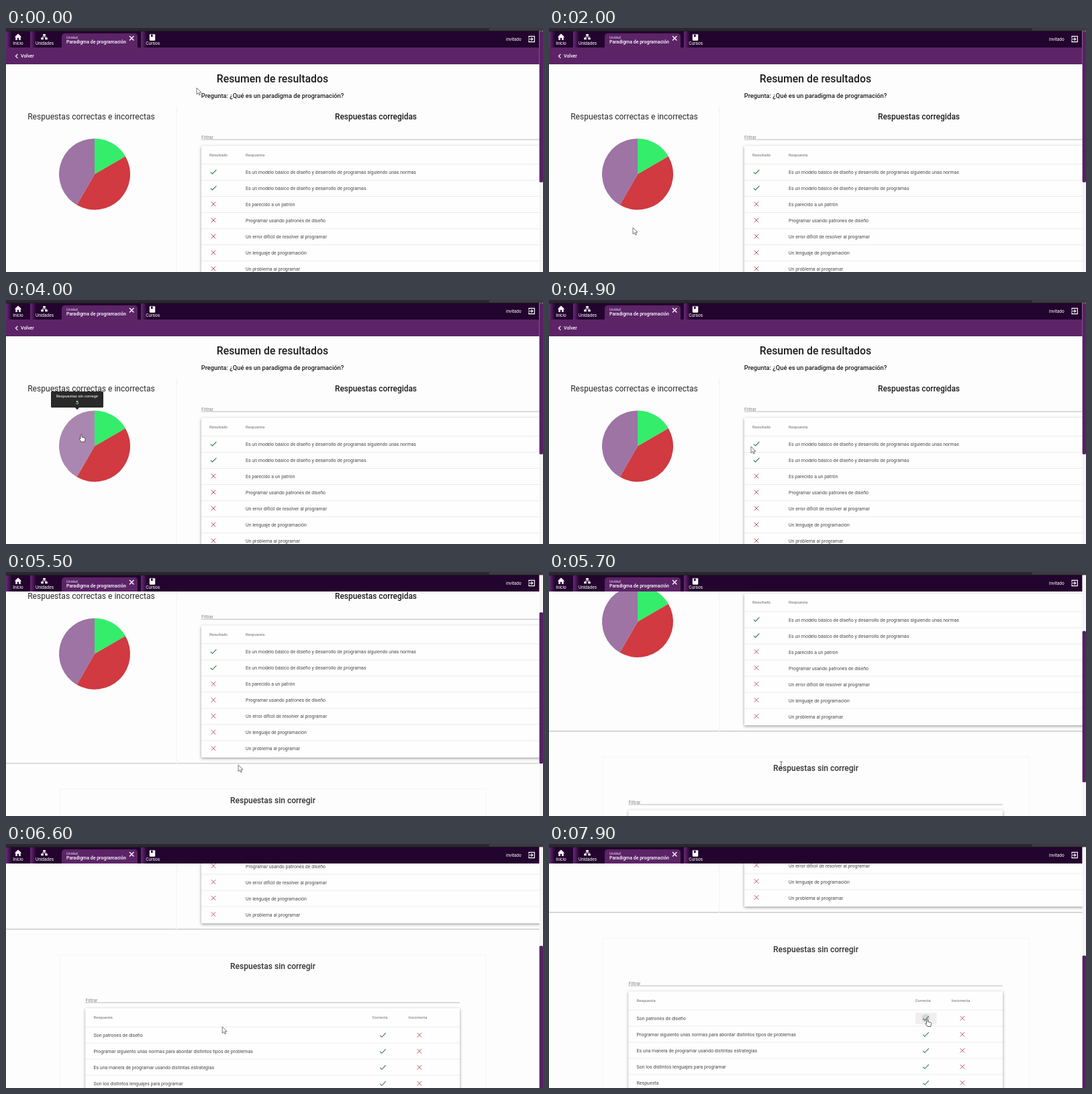
Recreate the animation shown at these times as an HTML page. Size 800x363 px, loop 8000 ms.

```html
<!DOCTYPE html>
<html lang="es">
<head>
<meta charset="utf-8">
<title>Resumen de resultados</title>
<style>
html, body { margin: 0; width: 100%; height: 100%; overflow: hidden; background: #fdfdfd; }
svg { display: block; width: 100vw; height: 100vh; font-family: Roboto, Arial, sans-serif; }
.m { font-weight: 500; }
</style>
</head>
<body>
<svg id="stage" viewBox="0 0 800 363">
  <defs>
    <linearGradient id="glow">
      <stop offset="0" stop-color="#6a2a78"/>
      <stop offset="1" stop-color="#6a2a78" stop-opacity="0"/>
    </linearGradient>
    <filter id="shadow" x="-5%" y="-8%" width="110%" height="120%">
      <feDropShadow dx="0" dy="1.4" stdDeviation="2.1" flood-color="#000" flood-opacity=".4"/>
    </filter>
  </defs>
  <rect width="800" height="363" fill="#fdfdfd"/>
  <g id="page"></g>
  <g id="header"></g>
  <rect x="794.6" y="4.5" width="5.4" height="359" fill="#f6f4f7"/>
  <rect id="thumb" x="794.6" width="5.4" height="225" rx="1.5" fill="#572163"/>
  <g id="cursor">
    <path id="arrow" d="M0 0V9.6L2.3 7.5L3.9 11L5.4 10.3L3.9 7H7Z" fill="#fff" stroke="#555" stroke-width=".8"/>
    <path id="ibeam" d="M-2 -5Q0 -5 0 -4Q0 -5 2 -5M0 -4V4M-2 5Q0 5 0 4Q0 5 2 5" fill="none" stroke="#555" stroke-width=".9"/>
    <path id="hand" d="M-1 .8Q0 -.6 1 .8V4L5 5Q6.2 5.4 6 7L5.2 11H.4L-2.8 7.2Q-3 5.8 -1 6.6Z" fill="#fff" stroke="#333" stroke-width=".8" stroke-linejoin="round"/>
  </g>
</svg>
<script>
const $ = id => document.getElementById(id);
const LOOP = 8000, STEP = 100;
const PIE = { x: 132, y: 217.4, r: 53 };

const text = (x, y, size, str, fill = '#4a4a4a', extra = '') =>
  `<text x="${x}" y="${y}" font-size="${size}" fill="${fill}" ${extra}>${str}</text>`;
const mid = 'text-anchor="middle"', bold = 'class="m"';
const rect = (x, y, w, h, fill, extra = '') =>
  `<rect x="${x}" y="${y}" width="${w}" height="${h}" fill="${fill}" ${extra}/>`;
const line = (d, color, width = 0.8, extra = '') =>
  `<path d="${d}" fill="none" stroke="${color}" stroke-width="${width}" ${extra}/>`;
const check = (x, y) => line(`M${x - 4.2} ${y + .4}L${x - 1.4} ${y + 3}L${x + 4.4} ${y - 3.2}`, '#2f7d4c', 1.1);
const cross = (x, y) => line(`M${x - 3.3} ${y - 3.3}l6.6 6.6m0 -6.6l-6.6 6.6`, '#bd5560', 1);

function slice(id, from, to, fill) {
  const at = part => {
    const a = part / 12 * 2 * Math.PI;
    return `${PIE.x + PIE.r * Math.sin(a)} ${PIE.y - PIE.r * Math.cos(a)}`;
  };
  return `<path id="${id}" d="M${PIE.x} ${PIE.y}L${at(from)}A${PIE.r} ${PIE.r} 0 0 1 ${at(to)}Z" fill="${fill}"/>`;
}

// Each tip sits above the middle of its slice's bounding box.
const tips = [
  { slice: 'wrong', label: 'Respuestas incorrectas', n: 5, x: 145, y: 190, w: 78, hover: [2500, 3300], show: [2500, 3400] },
  { slice: 'right', label: 'Respuestas correctas', n: 2, x: 155, y: 164, w: 73, hover: [3300, 3700], show: [3300, 3800] },
  { slice: 'open', label: 'Respuestas sin corregir', n: 5, x: 106, y: 164, w: 78, hover: [3700, 4100], show: [3700, 4200] }
];
const tip = (t, i) => `<g id="tip${i}">` +
  rect(t.x - t.w / 2, t.y - 28, t.w, 24, '#000', 'rx="1.5" fill-opacity=".84"') +
  `<path d="M${t.x - 3} ${t.y - 4}h6l-3 3.2z" fill="#222"/>` +
  text(t.x, t.y - 19, 6, t.label, '#fff', mid) +
  text(t.x, t.y - 9.4, 7, t.n, '#fff', mid) + '</g>';

function correctedTable() {
  const answers = [
    'Es un modelo básico de diseño y desarrollo de programas siguiendo unas normas',
    'Es un modelo básico de diseño y desarrollo de programas',
    'Es parecido a un patrón', 'Programar usando patrones de diseño',
    'Un error difícil de resolver al programar', 'Un lenguaje de programación',
    'Un problema al programar'
  ];
  return rect(291, 175.5, 512, 196, '#fefefe', 'filter="url(#shadow)"') +
    text(303, 190.6, 6, 'Resultado', '#888', bold) + text(357, 190.6, 6, 'Respuesta', '#888', bold) +
    answers.map((a, i) => {
      const y = 214.5 + 24 * i;
      return line(`M291 ${y - 12}H795`, '#e8e8e8') + (i < 2 ? check : cross)(309, y - .5) +
        text(357, y + 2.6, 7, a);
    }).join('');
}

function pendingTable() {
  const answers = [
    'Son patrones de diseño',
    'Programar siguiento unas normas para abordar distintos tipos de problemas',
    'Es una manera de programar usando distintas estrategias',
    'Son los distintos lenguajes para programar', 'Respuesta', 'Respuesta'
  ];
  return rect(118.5, 498, 557.5, 180, '#fefefe', 'filter="url(#shadow)"') +
    text(130.5, 513.6, 6, 'Respuesta', '#888', bold) +
    text(557, 513.6, 6, 'Correcta', '#888', `${mid} ${bold}`) +
    text(613.5, 513.6, 6, 'Incorrecta', '#888', `${mid} ${bold}`) +
    rect(546, 529.5, 31.5, 17, '#efefef', 'id="button" rx="1.5"') +
    '<circle id="ripple" cx="561.3" cy="537.5" r="6" fill="#d6d6d6"/>' +
    answers.map((a, i) => {
      const y = 537.5 + 24 * i;
      return line(`M118.5 ${y - 12}H676`, '#e8e8e8') + text(130.5, y + 2.6, 7, a) +
        check(561.3, y + .3) + cross(615.8, y + .3);
    }).join('');
}

$('page').innerHTML =
  rect(0, 28, 795, 26, '#5c2467') +
  line('M17.4 38.8L14.4 41.8L17.4 44.8', '#fff', 1.2) + text(22, 44.2, 7, 'Volver', '#fff', bold) +
  text(397, 80.8, 15.8, 'Resumen de resultados', '#1c1c1c', `${mid} ${bold}`) +
  text(397, 104, 9.3, 'Pregunta: ¿Qué es un paradigma de programación?', '#1c1c1c', `${mid} ${bold}`) +
  line('M254 116V380', '#ededed') +
  line('M0 380H253.4M254.6 380H795', '#c8c8c8', 1) + line('M0 381H795', '#e8e8e8', 1) +
  text(127, 135.8, 12.1, 'Respuestas correctas e incorrectas', '#2a2a2a', mid) +
  text(551, 135.6, 11.9, 'Respuestas corregidas', '#1c1c1c', `${mid} ${bold}`) +
  text(291, 164.8, 7, 'Filtrar', '#888') + line('M291 166H795', '#a8a8a8') +
  correctedTable() +
  slice('right', 0, 2, '#34ed6b') + slice('wrong', 2, 7, '#d03a40') + slice('open', 7, 12, '#9d74a4') +
  line('M80 690V418.5H715V690', '#f3f3f3') +
  text(397.5, 439.2, 12, 'Respuestas sin corregir', '#333', `${mid} ${bold}`) +
  text(118.5, 488.2, 7, 'Filtrar', '#888') + line('M118.5 489.5H676', '#a8a8a8') +
  pendingTable() + tips.map(tip).join('');

$('header').innerHTML =
  rect(0, 0, 800, 5, '#29292d') + rect(720, 0, 80, 4, '#3b3b40') +
  rect(0, 4.5, 794.6, 24.5, '#23042e') +
  [0, 36, 201].map(x => rect(x, 5, 9, 24, 'url(#glow)')).join('') +
  '<path d="M83 29V13Q83 8 88 8H191Q196 8 196 13V29Z" fill="#5c2467"/>' +
  '<path d="M18 8.6L23.2 13.4H21.7V18H19.2V14.8H16.8V18H14.3V13.4H12.8Z" fill="#fff"/>' +
  rect(55.2, 9, 3.6, 2.8, '#fff') + rect(52.2, 14.4, 3.6, 2.8, '#fff') + rect(58.2, 14.4, 3.6, 2.8, '#fff') +
  line('M57 11.8V13.2M54 14.4V13.2H60V14.4', '#fff') +
  rect(213.8, 9.3, 8.4, 9.4, '#fff', 'rx="1"') + '<path d="M216 9.8h2.6v4l-1.3 -1l-1.3 1z" fill="#23042e"/>' +
  text(18, 25.3, 6.5, 'Inicio', '#fff', mid) + text(57.5, 24.6, 6.5, 'Unidades', '#fff', mid) +
  text(218.7, 25.3, 6.6, 'Cursos', '#fff', mid) +
  text(90, 15.8, 5.4, 'Unidad', '#e6dbe9') + text(90, 23, 7, 'Paradigma de programación', '#fff', bold) +
  line('M184 12l6.4 6.4m0 -6.4l-6.4 6.4', '#fff', 1.4) +
  text(745, 18.9, 6.4, 'invitado', '#fff') +
  line('M779 14.8V12.3H787.3V20.6H779V18.1', '#fff', 1.2) +
  line('M778 16.5H784.6M782.4 14.2L784.7 16.5L782.4 18.8', '#fff', 1.1);

const scrollKeys = [[0, 0], [5100, 0], [5700, 143.5], [6000, 203.5], [6200, 203.5], [6800, 278.5], [LOOP, 278.5]];
const cursorKeys = [
  [0, 284, 89], [600, 284, 89], [1100, 262, 277], [1300, 266, 275], [1700, 266, 275],
  [2000, 125, 297], [2200, 127, 288], [2500, 140, 238], [2900, 150, 225], [3100, 150, 225],
  [3300, 151, 191], [3600, 146, 186], [3800, 112, 204], [4000, 112, 200], [4400, 368, 190],
  [4900, 301, 218], [5100, 301, 218], [5500, 346, 287], [6000, 346, 287], [6200, 342, 273],
  [6500, 342, 273], [7000, 152, 262], [7100, 152, 262], [7500, 563.5, 260.5], [LOOP, 563.5, 260.5]
];
const shapes = [[0, 'arrow'], [2500, 'hand'], [4100, 'arrow'], [5600, 'ibeam'], [6000, 'arrow'], [7500, 'hand']];

const clamp = v => Math.max(0, Math.min(1, v));
const smooth = v => v * v * (3 - 2 * v);
const linear = v => v;
function sample(keys, t, ease) {
  const i = keys.findIndex(k => k[0] > t);
  const a = keys[i - 1], b = keys[i];
  const p = ease((t - a[0]) / (b[0] - a[0]));
  return a.slice(1).map((v, j) => v + (b[j + 1] - v) * p);
}

function draw(t) {
  const [scroll] = sample(scrollKeys, t, linear);
  $('page').setAttribute('transform', `translate(0 ${-scroll})`);
  $('thumb').setAttribute('y', 4.5 + scroll * 0.58);

  const [x, y] = sample(cursorKeys, t, smooth);
  $('cursor').setAttribute('transform', `translate(${x} ${y})`);
  const shape = shapes.filter(s => s[0] <= t).pop()[1];
  for (const id of ['arrow', 'ibeam', 'hand']) $(id).style.display = id === shape ? '' : 'none';

  tips.forEach((tp, i) => {
    const hovered = t >= tp.hover[0] && t < tp.hover[1];
    $(tp.slice).setAttribute('opacity', hovered ? 0.86 : 1);
    const fade = clamp((t - tp.show[0]) / 200) * clamp((tp.show[1] - t) / 100);
    $('tip' + i).setAttribute('opacity', fade);
  });
  $('button').setAttribute('opacity', t >= 7500 ? 1 : 0);
  $('ripple').setAttribute('opacity', t >= 7900 ? 1 : 0);
}

const start = performance.now();
function tick() {
  const t = (performance.now() - start) % LOOP;
  draw(Math.floor(t / STEP) * STEP);
  requestAnimationFrame(tick);
}
tick();
</script>
</body>
</html>
```
